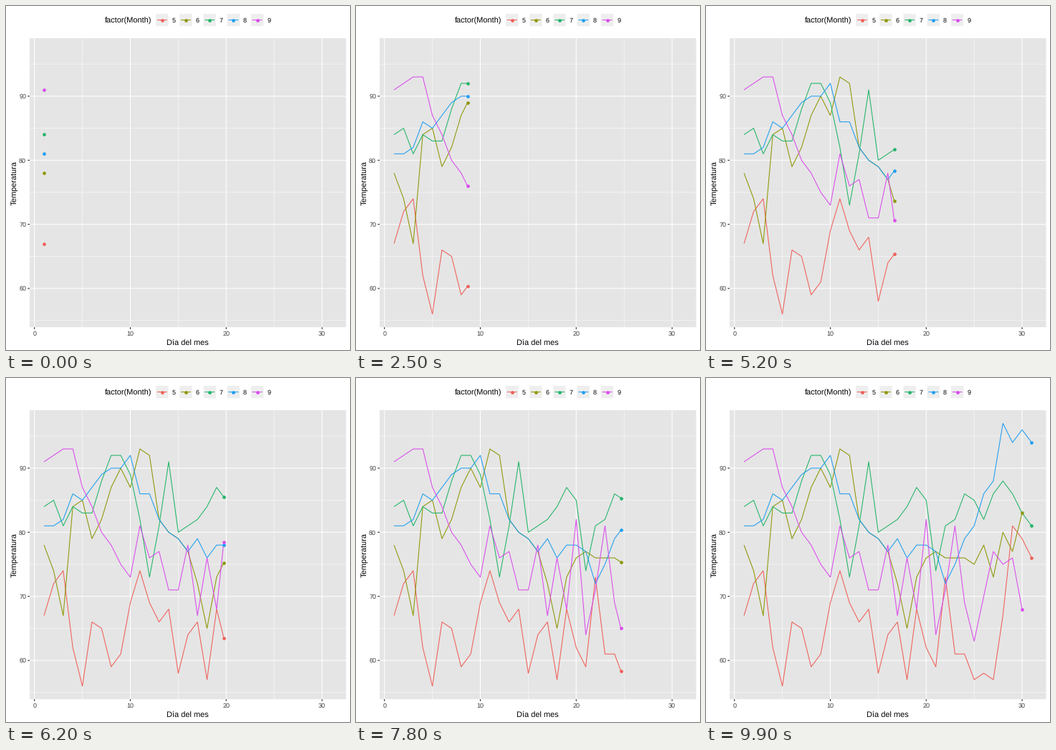
These frames come from a looping animation (480 by 480 pixels, 10 s). A matplotlib script:

```python
import numpy as np
import matplotlib.pyplot as plt
from matplotlib.animation import FuncAnimation
from matplotlib.patches import Rectangle

SIZE, FRAMES, INTERVAL = 480, 100, 100

plt.rcParams.update({
    "font.family": "Liberation Sans",
    "text.hinting": "none",
    "text.hinting_factor": 1,
    "path.snap": False,
    "path.simplify": False,
})

# Daily temperature for each month
may = [67, 72, 74, 62, 56, 66, 65, 59, 61, 69, 74, 69, 66, 68, 58, 64,
       66, 57, 68, 62, 59, 73, 61, 61, 57, 58, 57, 67, 81, 79, 76]
june = [78, 74, 67, 84, 85, 79, 82, 87, 90, 87, 93, 92, 82, 80, 79,
        77, 72, 65, 73, 76, 77, 76, 76, 76, 75, 78, 73, 80, 77, 83]
july = [84, 85, 81, 84, 83, 83, 88, 92, 92, 89, 82, 73, 81, 91, 80, 81,
        82, 84, 87, 85, 74, 81, 82, 86, 85, 82, 86, 88, 86, 83, 81]
august = [81, 81, 82, 86, 85, 87, 89, 90, 90, 92, 86, 86, 82, 80, 79, 77,
          79, 76, 78, 78, 77, 72, 75, 79, 81, 86, 88, 97, 94, 96, 94]
september = [91, 92, 93, 93, 87, 84, 80, 78, 75, 73, 81, 76, 77, 71, 71,
             78, 67, 76, 68, 82, 64, 71, 81, 69, 63, 70, 77, 75, 76, 68]
months = [may, june, july, august, september]
colors = ["#EF6059", "#8F9706", "#22B569", "#1F9FF0", "#DA4CEC"]

PANEL = "#E5E5E5"
KEY = "#EEEEEE"
TICK = "#262626"
LABEL = "#3C3C3C"
LEFT, RIGHT, TOP, BOTTOM = 33.0, 474.5, 44.9, 448.2
LINE, DOT = 1.07, 4.7


def px(day):
    return LEFT + (np.asarray(day) + 0.5) * (RIGHT - LEFT) / 33


def py(temp):
    return TOP + (99.05 - np.asarray(temp)) * (BOTTOM - TOP) / 45.1


fig = plt.figure(figsize=(SIZE / 72, SIZE / 72), dpi=72, facecolor="white")
ax = fig.add_axes([0, 0, 1, 1])
ax.set(xlim=(0, SIZE), ylim=(SIZE, 0))
ax.axis("off")


def box(x, y, w, h, color):
    ax.add_patch(Rectangle((x, y), w, h, fc=color, ec="none", zorder=0))


def stroke(xs, ys, color, width=LINE, z=1):
    return ax.plot(xs, ys, color=color, lw=width, zorder=z,
                   solid_capstyle="butt", solid_joinstyle="round")[0]


def dot(x, y, color, z=4):
    return ax.plot([x], [y], "o", color=color, ms=DOT, mew=0, zorder=z)[0]


def label(x, y, text, size=8.8, color=LABEL, ha="center", **kw):
    ax.text(x, y, text, fontsize=size, color=color, ha=ha, va="baseline", **kw)


def draw_axes():
    box(LEFT, TOP, RIGHT - LEFT, BOTTOM - TOP, PANEL)
    for day in range(0, 31, 5):
        x, major = px(day), day % 10 == 0
        stroke([x, x], [TOP, BOTTOM], "white", LINE if major else LINE / 2)
        if major:
            stroke([x, x], [BOTTOM, BOTTOM + 2.75], TICK)
            label(x, 460, str(day))
    for temp in range(55, 96, 5):
        y, major = py(temp), temp % 10 == 0
        stroke([LEFT, RIGHT], [y, y], "white", LINE if major else LINE / 2)
        if major:
            stroke([LEFT - 2.75, LEFT], [y, y], TICK)
            label(28.1, y + 3.2, str(temp), ha="right")
    label((LEFT + RIGHT) / 2, 473, "Día del mes", 11, "black")
    label(14, (TOP + BOTTOM) / 2, "Temperatura", 11, "black",
          rotation=90, rotation_mode="anchor")


def draw_legend():
    label(138, 24, "factor(Month)", 11, "black", "left")
    for i, color in enumerate(colors):
        x, y = 217.8 + 33.18 * i, 19.5
        box(x - 8.64, y - 8.64, 17.28, 17.28, KEY)
        stroke([x - 6.9, x + 6.9], [y, y], color)
        dot(x, y, color)
        label(x + 13.7, 23, str(5 + i), color="black", ha="left")


draw_axes()
draw_legend()
lines = [stroke([], [], c, z=2 + i / 10) for i, c in enumerate(colors)]
dots = [dot(0, 0, c, 4 + i / 10) for i, c in enumerate(colors)]

# Each day begins on a whole frame, so days last three or four frames
days = np.arange(1, 32)
day_start = np.round((days - 1) * (FRAMES - 1) / 30)


def update(frame):
    now = np.interp(frame, day_start, days)
    for temps, line, head in zip(months, lines, dots):
        end = min(now, len(temps))
        past = int(end)
        xs = np.append(days[:past], end)
        ys = np.append(temps[:past], np.interp(end, days[:len(temps)], temps))
        line.set_data(px(xs), py(ys))
        head.set_data([px(end)], [py(ys[-1])])
    return lines + dots


anim = FuncAnimation(fig, update, frames=FRAMES, interval=INTERVAL,
                     repeat=True, repeat_delay=0, blit=False)
plt.show()
```
